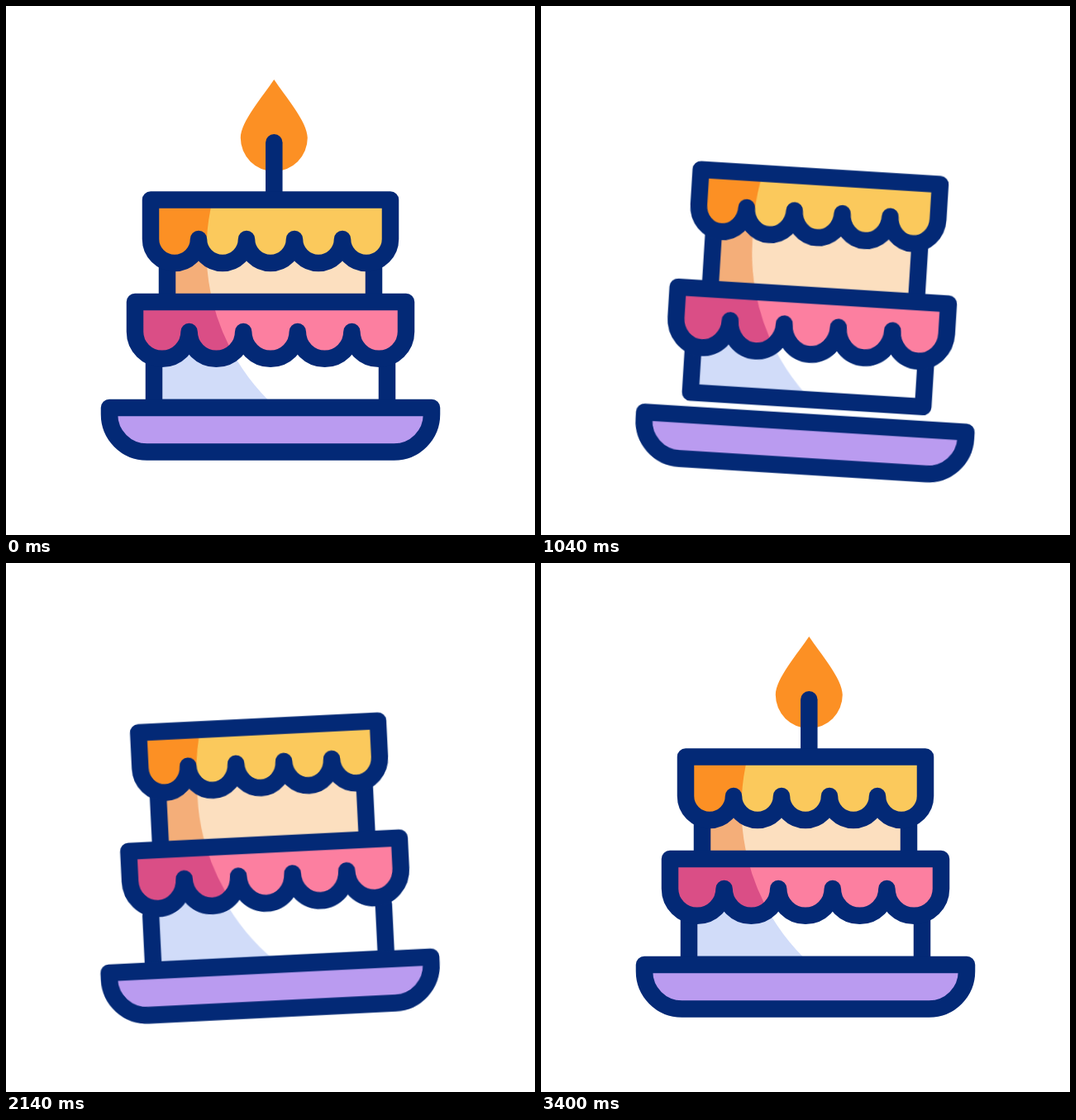
Animation of 640 by 640 pixels, one loop 3600 ms. Source, as an HTML page:

```html
<!DOCTYPE html>
<html lang="en">
<head>
<meta charset="utf-8">
<title>Birthday cake</title>
<style>
  :root { --sine: cubic-bezier(.37, 0, .63, 1); }
  html, body { margin: 0; width: 100%; height: 100%; overflow: hidden; background: #fff; }
  svg { display: block; width: 100vw; height: 100vh; }

  .line { fill: none; stroke: #032976; stroke-width: 20.5; stroke-linecap: round; stroke-linejoin: round; }

  .tilt { transform-origin: 320px 500px; animation: tilt 3.6s var(--sine) infinite; }
  .plate { animation: plate 3.6s var(--sine) infinite; }
  .base { animation: base 3.6s var(--sine) infinite; }
  .base-light { animation: base-light 3.6s var(--sine) infinite; }
  .lower { animation: lower 3.6s var(--sine) infinite; }
  .upper { animation: upper 3.6s var(--sine) infinite; }
  .pink { animation: pink-drip 3.6s var(--sine) infinite; }
  .yellow { animation: yellow-drip 3.6s var(--sine) infinite; }
  .stick { --lift: -51px; }
  .flame { --lift: -43.5px; }
  .stick, .flame { animation: candle 3.6s var(--sine) infinite, fade 3.6s linear infinite; }
  .flame path { transform-origin: 324.3px 160px; animation: grow 3.6s linear infinite; }
  .sparks circle { animation: burst 3.6s linear infinite; }

  @keyframes tilt {
    0%, 15.3% { transform: rotate(0deg); }
    26.39% { transform: rotate(3.75deg); }
    51.67% { transform: rotate(-3.75deg); }
    81.39% { transform: rotate(2deg); }
    93.89%, 100% { transform: rotate(0deg); }
  }
  @keyframes plate {
    0%, 5.56% { transform: translateY(0); }
    21.67% { transform: translateY(24px); }
    49.44% { transform: translateY(-18px); }
    72.22% { transform: translateY(27px); }
    93.89%, 100% { transform: translateY(0); }
  }
  @keyframes base {
    0%, 5.56% { transform: translateY(0); }
    21.94% { transform: translateY(-15px); }
    39.44% { transform: translateY(0); }
    50% { transform: translateY(-17.5px); }
    72.22% { transform: translateY(27px); }
    93.89%, 100% { transform: translateY(0); }
  }
  @keyframes base-light {
    0%, 5.56% { transform: translateY(0); }
    21.67% { transform: translateY(3px); }
    49.44% { transform: translateY(-6px); }
    72.22%, 100% { transform: translateY(0); }
  }
  @keyframes lower {
    0%, 5.56% { transform: translateY(0); }
    21.94% { transform: translateY(-23px); }
    39.44% { transform: translateY(20.5px); }
    52.22% { transform: translateY(-35px); }
    72.5% { transform: translateY(27px); }
    93.89%, 100% { transform: translateY(0); }
  }
  @keyframes upper {
    0%, 5.56% { transform: translateY(0); }
    21.94% { transform: translateY(-59px); }
    39.44% { transform: translateY(31px); }
    52.78% { transform: translateY(-58px); }
    72.78% { transform: translateY(27px); }
    93.89%, 100% { transform: translateY(0); }
  }
  /* the scallops of the icing deepen while the cake bounces */
  @keyframes pink-drip {
    0%, 5.56%, 80%, 100% {
      d: path("M156 358H484V394a32.8 32.8 0 0 1-65.6 0a32.8 32.8 0 0 1-65.6 0a32.8 32.8 0 0 1-65.6 0a32.8 32.8 0 0 1-65.6 0a32.8 32.8 0 0 1-65.6 0Z");
    }
    19.44%, 51.67% {
      d: path("M156 358H484V394.5a32.8 35 0 0 1-65.6 0a32.8 35 0 0 1-65.6 0a32.8 35 0 0 1-65.6 0a32.8 35 0 0 1-65.6 0a32.8 35 0 0 1-65.6 0Z");
    }
  }
  @keyframes yellow-drip {
    0%, 5.56%, 80%, 100% {
      d: path("M175 234.5H465V282a29 29 0 0 1-58 0a29 29 0 0 1-58 0a29 29 0 0 1-58 0a29 29 0 0 1-58 0a29 29 0 0 1-58 0Z");
    }
    19.44%, 51.67% {
      d: path("M175 234.5H465V277a29 31 0 0 1-58 0a29 31 0 0 1-58 0a29 31 0 0 1-58 0a29 31 0 0 1-58 0a29 31 0 0 1-58 0Z");
    }
  }
  @keyframes candle {
    0%, 5.56% { transform: translateY(0); }
    21.94%, 22.22% { transform: translateY(var(--lift)); animation-timing-function: step-end; }
    61.11% { transform: translateY(-150px); animation-timing-function: linear; }
    67.22% { transform: translateY(-57.5px); animation-timing-function: cubic-bezier(.4, .4, .6, 1); }
    72.5% { transform: translateY(27px); }
    93.89%, 100% { transform: translateY(0); }
  }
  @keyframes fade {
    0%, 16.67% { opacity: 1; }
    22.22%, 61.11% { opacity: 0; }
    68.83%, 100% { opacity: 1; }
  }
  @keyframes grow {
    0%, 22.22% { transform: scale(1); animation-timing-function: step-end; }
    61.11% { transform: scale(0); }
    68.83%, 100% { transform: scale(1); }
  }
  @keyframes burst {
    0%, 71.11% { transform: translate(324px, 160px) scale(0); opacity: 1; }
    79.44% {
      transform: translate(calc(324px + var(--x)), calc(160px + var(--y))) scale(1);
      opacity: 1;
      animation-timing-function: ease-out;
    }
    88.89%, 100% {
      transform: translate(calc(324px + var(--x) * 1.38), calc(160px + var(--y) * 1.38)) scale(1);
      opacity: 0;
    }
  }
</style>
</head>
<body>
<svg viewBox="0 0 640 640" xmlns="http://www.w3.org/2000/svg">
  <defs>
    <path id="plate" d="M125 486H515V494A45.5 45.5 0 0 1 469.5 539.5H170.5A45.5 45.5 0 0 1 125 494Z"/>
    <path id="base" d="M179 400V486H461V400Z"/>
    <path id="sponge" d="M195 250V358H445V250Z"/>
    <!-- the lit side of every layer lies inside this circle -->
    <circle id="light" cx="498.5" cy="296" r="256"/>
    <clipPath id="inBase"><use href="#base"/></clipPath>
    <clipPath id="inSponge"><use href="#sponge"/></clipPath>
    <clipPath id="inPink"><path class="pink"/></clipPath>
    <clipPath id="inYellow"><path class="yellow"/></clipPath>
  </defs>

  <g class="sparks" fill="#fdc95c">
    <circle r="10.5" style="--x: -126px; --y: -63px"/>
    <circle r="10.5" style="--x: 126px; --y: -63px"/>
    <circle r="10.5" style="--x: -76px; --y: -23px"/>
    <circle r="10.5" style="--x: 76px; --y: -23px"/>
    <circle r="10.5" style="--x: -85px; --y: 23px"/>
    <circle r="10.5" style="--x: 84px; --y: 23px"/>
  </g>

  <g class="tilt">
    <g class="flame">
      <path fill="#fc9024" d="M324.3 89C311 109 283.8 140 283.8 159.5A40.5 40.5 0 0 0 364.8 159.5C364.8 140 337.6 109 324.3 89Z"/>
    </g>
    <path class="line stick" d="M324.3 165.3V247"/>

    <g class="base">
      <use href="#base" fill="#d1dcf9"/>
      <g clip-path="url(#inBase)"><use class="base-light" href="#light" fill="#fff"/></g>
      <path class="line" d="M179 420V486H461V420"/>
    </g>

    <g class="plate">
      <use href="#plate" fill="#ba9bf0"/>
      <use href="#plate" class="line"/>
    </g>

    <g class="lower">
      <use href="#sponge" fill="#f4ae79"/>
      <g clip-path="url(#inSponge)"><use href="#light" fill="#fcdfbf"/></g>
      <path class="line" d="M195 265V358M445 265V358"/>
      <path class="pink" fill="#da4e86"/>
      <g clip-path="url(#inPink)"><use href="#light" fill="#fc7fa0"/></g>
      <g class="line"><path class="pink"/></g>
    </g>

    <g class="upper">
      <path class="yellow" fill="#fc9024"/>
      <g clip-path="url(#inYellow)"><use href="#light" fill="#fbc95c"/></g>
      <g class="line"><path class="yellow"/></g>
    </g>
  </g>
</svg>
</body>
</html>
```
